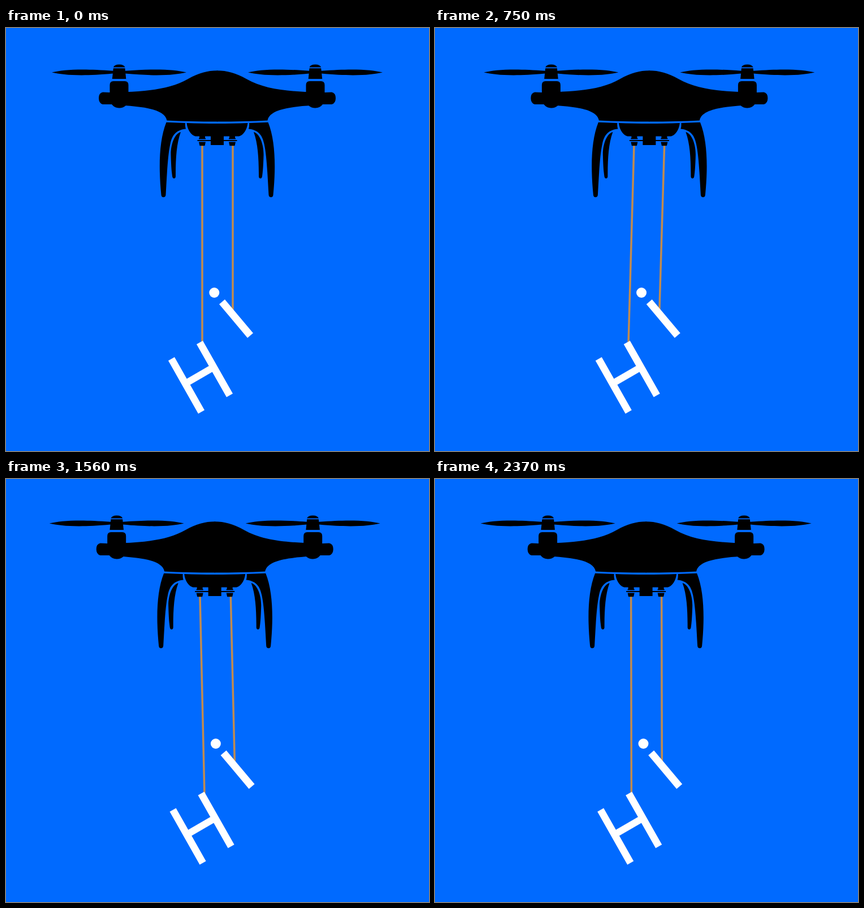
Animation of 748 by 748 pixels, one loop 2.4 s. Source, as an HTML page:

```html
<!DOCTYPE html>
<html lang="en">
<head>
<meta charset="utf-8">
<title>Drone</title>
<style>
  html, body { margin: 0; width: 100%; height: 100%; overflow: hidden; background: #006aff; }
  svg { display: block; width: 100%; height: 100%; }
</style>
</head>
<body>
<svg viewBox="0 0 748 748">
  <defs>
    <g id="half">
      <!-- propeller -->
      <path d="M81 78.5C102 73.5 135 71.5 189 75.8L211 75.8C265 71.5 298 73.5 319 78.5C298 83.5 265 85.5 211 80.6L189 80.6C135 85.5 102 83.5 81 78.5Z"/>
      <path d="M189.8 69.6Q192 64.5 200 64.5Q208.5 64.5 210.5 69.6Z"/>
      <path d="M189.8 71.3H210.5L212.3 90H187.8Z"/>
      <!-- motor and arm -->
      <path d="M183.5 114V101Q183.5 94 190 94H210Q216.5 94 216.5 101V114L212 137Q207 141.5 200 141.5Q192 141.5 187 135H171Q164 133 164 124Q164 115 171 113.5Z"/>
      <path d="M210 113.3C258 111 292 107 322 90C341 79.5 356 75.3 374 75.3V165.5Q325 165.5 284.5 163.5C281 144 245 139.5 206 136.8Z"/>
      <!-- legs -->
      <path d="M283.5 166.8L317 168Q316.5 174 318 178.5C302 180 294 188 290.5 205C286 225 284.5 260 282.5 295Q282 299.3 278.3 299.3Q275 299.3 274.5 295C270 250 270 200 283.5 166.8Z"/>
      <path d="M309 184C299 186 291 205 291.5 225C292 245 293 255 294 262Q294.5 266 297 266Q300 266 300 262C300 235 301 205 309 184Z"/>
      <!-- camera mount -->
      <path d="M319.5 168Q345 169 374 169V207H362V191.5H335C328 190 321 181 319.5 168Z"/>
      <path d="M342 190H352V194.5H353V196.5H341V194.5H342ZM338.5 198H374V200H338.5ZM341 201.5H353L351.5 208.3H342.5Z"/>
    </g>
  </defs>
  <g stroke="#c08b50" stroke-width="3.5">
    <line id="ropeH" y1="206" y2="557"/>
    <line id="ropeI" y1="206" y2="499"/>
  </g>
  <g id="drone">
    <use href="#half"/>
    <use href="#half" transform="matrix(-1 0 0 1 747 0)"/>
  </g>
  <g id="letters" role="img" aria-label="Hi" fill="none" stroke="#fff" stroke-width="12.7">
    <path d="M292.5 585.2L345.5 678.8M342.5 556.2L395.5 649.7"/>
    <path d="M317.2 628.7L367.2 599.7" stroke-width="12.2"/>
    <path d="M382 484.2L432 543.7" stroke-width="13"/>
    <circle cx="368.3" cy="468" r="9" fill="#fff" stroke="none"/>
  </g>
</svg>
<script>
const LOOP = 2400, STEP = 30;
const get = id => document.getElementById(id);
const [drone, letters, ropeH, ropeI] = ['drone', 'letters', 'ropeH', 'ropeI'].map(get);

// Triangle wave: 0, 1, 0, -1, 0 over one loop.
const swing = p => 1 - Math.abs(((p + 0.25) % 1) * 4 - 2);

const shift = (el, dx) => el.setAttribute('transform', `translate(${dx} 0)`);

function hang(rope, x, top, bottom) {
  rope.setAttribute('x1', x + top);
  rope.setAttribute('x2', x + bottom);
}

function draw(now) {
  const t = Math.floor((now % LOOP) / STEP) * STEP;
  const s = swing(t / LOOP);
  shift(drone, 7.2 * s);
  shift(letters, -4.3 * s);
  hang(ropeH, 347, 6.7 * s, -6.6 * s);
  hang(ropeI, 401, 6.2 * s, -5.5 * s);
}

const start = performance.now();
function tick() {
  draw(performance.now() - start);
  requestAnimationFrame(tick);
}
tick();
</script>
</body>
</html>
```
